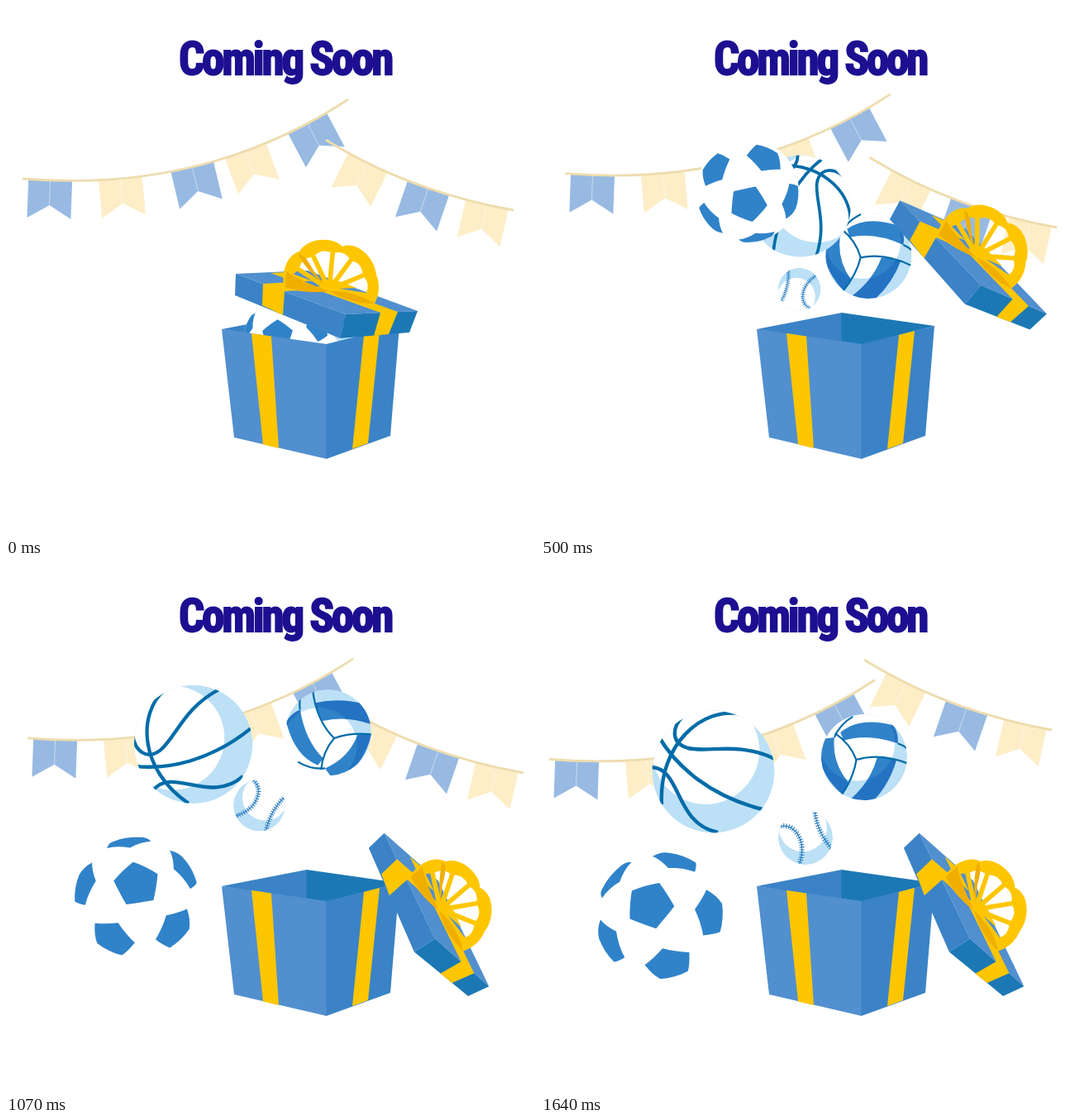
Recreate the animation shown at these times as an HTML page. Size 640 by 640 pixels, loop 1.78 s.

```html
<!DOCTYPE html>
<html lang="en">
<head>
<meta charset="utf-8">
<title>Coming Soon</title>
<style>
  html, body { margin: 0; width: 100%; height: 100%; overflow: hidden; background: #fff; }
  svg { display: block; width: 100vw; height: 100vh; }
  .title {
    font: 900 55px "Roboto Condensed", Roboto, sans-serif;
    font-stretch: 75%;
    letter-spacing: -3.2px;
    fill: #1c1091; stroke: #1c1091; stroke-width: 1.8;
  }
  .sky { fill: #98bae2; }
  .cream { fill: #fdeec8; }
  .string { fill: none; stroke: #eedcae; stroke-width: 2.8; }
  .crease { stroke: #fff; stroke-opacity: .25; }
  .light { fill: #518fcf; }
  .mid { fill: #3b83c6; }
  .dark { fill: #1c78b4; }
  .gold { fill: #fec600; fill-rule: evenodd; }
  .amber { fill: #f0ae00; }
  .patch { fill: #3083c9; }
  .white { fill: #fff; }
  .line { fill: none; stroke: #006ca8; stroke-width: 4.4; }
  .thin { stroke-width: 2.2; }
  .seam { fill: none; stroke: #2b7ec2; stroke-width: 1.2; }
  .stitch { fill: none; stroke: #2b7ec2; stroke-width: 6; stroke-dasharray: 1.1 2; }
  .shade { fill: #bce0f6; fill-rule: evenodd; mix-blend-mode: multiply; }
</style>
</head>
<body>
<svg viewBox="0 0 640 640">
  <defs>
    <path id="shade" d="M1 0A1 1 0 1 1-1 0A1 1 0 1 1 1 0ZM.51 0A.88 .88 0 1 1-1.25 0A.88 .88 0 1 1 .51 0Z"/>
    <path id="seams" d="M287 319Q303 315 311 329Q320 344 312 366M331 299Q334 325 351 345"/>
    <clipPath id="basketClip"><circle cx="208.5" cy="252.5" r="74"/></clipPath>
    <clipPath id="volleyClip"><circle cx="392" cy="232" r="52"/></clipPath>
    <clipPath id="baseClip"><circle cx="320" cy="332" r="33"/></clipPath>
  </defs>

  <text class="title" x="337.5" y="83" text-anchor="middle">Coming Soon</text>

  <g id="leftFlags"></g>
  <g id="rightFlags"></g>

  <path class="mid" d="M261 391L364 371V408Z"/>
  <path class="dark" d="M363.5 371L476 387L388 410L363.5 406Z"/>

  <g id="baseball"><g clip-path="url(#baseClip)">
    <circle class="white" cx="320" cy="332" r="33"/>
    <use href="#shade" class="shade" transform="translate(320 332) rotate(75) scale(33)"/>
    <use href="#seams" class="seam"/>
    <use href="#seams" class="stitch"/>
  </g></g>

  <g id="volleyball"><g transform="translate(-1 3) rotate(19 392 232)" clip-path="url(#volleyClip)">
    <circle class="white" cx="392" cy="232" r="52"/>
    <path class="patch" d="M355 213Q371 187 413 184Q422 191 425 203Q386 203 362 221ZM336 228L350 221Q357 251 384 267L381 283Q346 268 336 240ZM411 226L430 221Q432 254 418 282L392 287Q409 258 407 228Z"/>
    <use href="#shade" class="shade" transform="translate(392 232) rotate(45) scale(52)"/>
    <path class="line thin" d="M384 238Q371 222 349 216M384 238Q409 220 446 222M384 238Q388 259 381 284M425 203Q436 203 444 208M350 221Q351 204 363 190"/>
  </g></g>

  <g id="basketball"><g clip-path="url(#basketClip)">
    <circle class="white" cx="208.5" cy="252.5" r="74"/>
    <use href="#shade" class="shade" transform="translate(208.5 252.5) rotate(70) scale(74)"/>
    <path class="line" d="M172 185C158 199 157 218 178 224C204 230 238 215 285 238M242 183C196 173 142 219 146 292M143 211C164 246 204 282 268 298M132 247C171 247 160 315 214 326"/>
  </g></g>

  <g id="soccer">
    <circle class="white" cx="145" cy="429" r="79"/>
    <path id="panels" class="patch" transform="translate(145 429) rotate(-131) scale(79)"/>
  </g>

  <path class="light" d="M261 391L388 409V548L276 522Z"/>
  <path class="mid" d="M387.5 409L476 387L465 520L387.5 548Z"/>
  <path class="gold" d="M297 396L321 399.5L330 535L311 530.5ZM433 398L452 393L438 529L419 536Z"/>

  <g id="lid">
    <path class="light" d="M278 324L365 320L498 369L411 373Z"/>
    <path class="mid" d="M278 324L411 373L404 402L277 350Z"/>
    <path class="dark" d="M411 373L498 369L488 395L404 402Z"/>
    <path class="gold" d="M311 336L398 331L424 341L337 345L335 374L310 362ZM320 323L341 322L474 370L463 397L445 399L453 371Z"/>
    <path id="bow" class="gold" d="M336 340C333 316 343 300 355 297C365 279 397 279 407 291C425 284 446 305 448 325C454 340 450 352 446 360C428 362 405 352 391 345C374 347 351 346 336 340Z"/>
    <path class="amber" d="M339 321Q354 332 391 345Q369 349 338 340ZM353 300Q361 299 372 320L386 338Q362 318 353 300ZM391 345Q421 344 446 360Q418 361 391 345Z"/>
  </g>
</svg>

<script>
const LOOP = 1780, FPS = 14, LAST = 23, SWAY = 11;
const { sin, cos, PI, min, hypot } = Math;
const rad = deg => deg * PI / 180;
const byId = id => document.getElementById(id);
const mix = (a, b, u) => a + (b - a) * u;
const clamp = u => min(1, Math.max(0, u));
const wave = u => (1 - cos(PI * u)) / 2;
const roll = u => u - .05 * sin(2 * PI * u);
const outline = points => 'M' + points.map(p => p.slice(0, 2).map(n => n.toFixed(3)).join(' ')).join('L') + 'Z';

// Swallow-tailed flags hang at right angles from a quadratic curve.
function bunting(id, [a, b, c], spots, colours) {
  const flags = spots.map((t, i) => {
    const at = n => mix(mix(a[n], b[n], t), mix(b[n], c[n], t), t);
    const dx = mix(b[0] - a[0], c[0] - b[0], t), dy = mix(b[1] - a[1], c[1] - b[1], t);
    const ux = dx / hypot(dx, dy), uy = dy / hypot(dx, dy);
    const point = (along, down) => [at(0) + ux * along - uy * down, at(1) + uy * along + ux * down];
    const shape = outline([point(-26.5, 0), point(26.5, 0), point(26.5, 46), point(0, 30), point(-26.5, 46)]);
    return `<path class="${colours[i % 2]}" d="${shape}"/>
      <path class="crease" d="${outline([point(0, 1), point(0, 30)])}"/>`;
  });
  byId(id).innerHTML = flags.join('') + `<path class="string" d="M${a}Q${b} ${c}"/>`;
}
bunting('leftFlags', [[20, 209], [240, 227], [414, 113]], [.077, .277, .492, .659, .861], ['sky', 'cream']);
bunting('rightFlags', [[387, 162], [487, 224], [614, 247]], [.245, .575, .872], ['cream', 'sky']);

// One pentagon near the viewer and its five neighbours, projected from a unit sphere.
const fifths = [0, 72, 144, 216, 288];
const spin = ([x, y, z], d) => [x * cos(rad(d)) - y * sin(rad(d)), x * sin(rad(d)) + y * cos(rad(d)), z];
const tilt = ([x, y, z], d) => [x * cos(rad(d)) + z * sin(rad(d)), y, z * cos(rad(d)) - x * sin(rad(d))];
function project(p) {
  const [x, y, z] = tilt(p, 15.4), size = z < 0 ? hypot(x, y) : hypot(x, y, z);
  return [x / size, y / size];
}
function pentagon(place) {
  const corner = d => spin(tilt([0, 0, 1], 22), 180 + d);
  const edge = d => [0, .25, .5, .75].map(u => corner(d).map((n, i) => mix(n, corner(d + 72)[i], u)));
  return outline(fifths.flatMap(edge).map(place).map(project));
}
byId('panels').setAttribute('d', pentagon(p => spin(p, 62 - 180))
  + fifths.map(d => pentagon(p => spin(tilt(p, 63.4), 62 + d))).join(''));

// Openings between the loops of the bow fan out from the knot.
const spoke = (r, d) => `${391 + r * cos(rad(d))} ${343 + r * sin(rad(d))}`;
let openings = '';
for (let d = -162; d < 0; d += 31)
  openings += `M${spoke(11, d)}L${spoke(45, d - 12)}Q${spoke(50, d)} ${spoke(45, d + 12)}Z`;
byId('bow').setAttribute('d', byId('bow').getAttribute('d') + openings);

const sway = (out, back) => k => {
  const u = min(1, k / SWAY), v = clamp((k - SWAY) / (LAST - SWAY));
  return `translate(${out[0] * u + back[0] * v} ${out[1] * u + back[1] * v})`;
};

const pose = (x, y, angle, size, home) =>
  `translate(${x} ${y}) rotate(${angle}) scale(${size}) translate(${-home[0]} ${-home[1]})`;

// A ball rises from the box to its peak, then drops to rest while it rolls and grows.
const toss = ({ from, peak: [top, high], rest, steps, swing, drop, turn, size }) => k => {
  const u = clamp(k / steps), e = roll(u);
  const y = k < top
    ? mix(from[1], high, wave(k / top))
    : mix(high, rest[1], wave(clamp((k - top) / (steps - top)) ** drop));
  return pose(mix(from[0], rest[0], e) + swing * sin(PI * u), y, turn * (1 - e), mix(size, 1, e), rest);
};

// The lid is thrown off like a projectile and leans on the box.
function throwLid(k) {
  const u = min(1, k / 11.8);
  return pose(388 + 133 * u * (2.75 - 1.75 * u), 346.5 + u * (356 * u - 283), 44.1 * u, 1, [388, 346.5]);
}

const motions = {
  leftFlags: sway([14, -10], [-24, 38.5]),
  rightFlags: sway([16, 33], [-12, -78]),
  baseball: toss({ from: [350, 440], peak: [12.3, 280], rest: [320, 332],
    steps: 19, swing: -30, drop: 1.2, turn: 325, size: .68 }),
  volleyball: toss({ from: [406, 450], peak: [12.7, 195], rest: [391, 235],
    steps: 21, swing: -6, drop: .85, turn: -500, size: 1 }),
  basketball: toss({ from: [380, 430], peak: [11.3, 155], rest: [208.5, 252.5],
    steps: 18, swing: -6, drop: .85, turn: -430, size: .74 }),
  soccer: toss({ from: [340, 405], peak: [7.7, 220], rest: [145, 429],
    steps: 18, swing: -22, drop: .68, turn: 339, size: .67 }),
  lid: throwLid
};

const startOf = k => Math.round(k * 100 / FPS) * 10;

let shown = -1;
function draw() {
  const t = performance.now() % LOOP;
  let k = LAST;
  while (startOf(k) > t) k--;
  if (k !== shown) {
    shown = k;
    for (const id in motions) byId(id).setAttribute('transform', motions[id](k));
  }
  requestAnimationFrame(draw);
}
draw();
</script>
</body>
</html>
```
